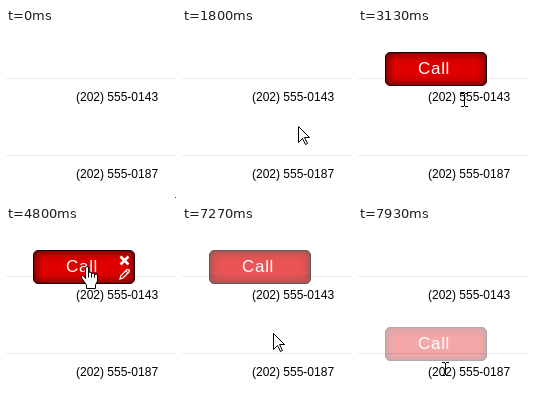
Write an HTML page that moves like this. It is 170 px wide and 170 px high and loops after 8 s.

```html
<!DOCTYPE html>
<html lang="en">
<head>
<meta charset="utf-8">
<title>Click to call</title>
<style>
  html, body { margin: 0; width: 100%; height: 100%; overflow: hidden; background: #fff; }
  body { position: relative; font: 12px/14px Arial, "Liberation Sans", sans-serif; color: #000; }
  .row { position: absolute; left: 0; width: 100%; height: 1px; background: #ebebeb; }
  .row span { position: absolute; left: 70px; top: 12px; white-space: nowrap; }
  #call {
    position: absolute; left: 27px; top: 24px; width: 102px; height: 34px;
    box-sizing: border-box; border: 1px solid #140404; border-radius: 5px;
    background: #e00000; box-shadow: inset 0 0 8px 1px rgba(30, 0, 0, .75);
    opacity: 0;
  }
  #call span {
    position: absolute; left: 32px; top: 6px;
    font-size: 17px; line-height: 20px; letter-spacing: .7px; color: #fff;
  }
  #icons { position: absolute; left: 85px; top: 4px; fill: none; stroke: #fff; }
  #pointer { position: absolute; left: 0; top: 0; }
</style>
</head>
<body>
<div class="row" style="top:50px"><span>(202) 555-0143</span></div>
<div class="row" style="top:127px"><span>(202) 555-0187</span></div>

<div id="call">
  <span>Call</span>
  <svg id="icons" width="11" height="25">
    <path d="M1.5 1.5l8 8M9.5 1.5l-8 8" stroke-width="2.6"/>
    <path d="M1 24l.8-3.2 6-6q1-.8 2 .2t.2 2l-6 6zM6.8 15.8l2.4 2.4" stroke-width="1.2"/>
  </svg>
</div>

<svg id="pointer" width="170" height="170">
  <g id="cursor">
    <path id="arrow" fill="#fff" stroke="#000"
      d="M.5 .5V16.5L4.5 12.5L7.5 18.5L9.5 17.5L6.5 11.5H11.5Z"/>
    <path id="beam" d="M-3-7h3v1h1v-1h3v1h-3v12h3v1h-3v-1h-1v1h-3v-1h3v-12h-3z"/>
    <g id="hand" transform="translate(-7 -1)" stroke="#000" fill="#fff">
      <path d="M5.5 12V2a1.5 1.5 0 0 1 3 0V7.5a1.5 1.5 0 0 1 3 0V8.5a1.5 1.5 0 0 1 3 0V9.5a1.5 1.5 0 0 1 3 0V15l-2 4v3.5h-9V19l-5-7.2q-.8-2 1-2.2 1.6 .4 3 3z"/>
      <path fill="none" d="M8.5 7v4.5M11.5 8v3.5M14.5 9v2.5"/>
    </g>
  </g>
</svg>

<script>
const LOOP = 8000, STEP = 200 / 3, FADE = 450, ROW = 77;
const $ = id => document.getElementById(id);
const call = $('call'), icons = $('icons'), cursor = $('cursor');
const shapes = ['arrow', 'beam', 'hand'].map($);

const settle = u => 1 - (1 - u) ** 1.5;
const smooth = u => u * u * (3 - 2 * u);
const progress = (t, from, to) => Math.min(1, Math.max(0, (t - from) / (to - from)));

// Pointer moves, each starting where the one before ended
const moves = [
  { from: 1000, to: 1933, x: 113, y: 98, ease: settle },
  { from: 2067, to: 3000, x: 106, y: 72, ease: settle },
  { from: 4067, to: 4600, x: 81, y: 41, ease: smooth },
  { from: 6467, to: 7800, x: 87, y: 143, ease: smooth, bow: 6 }
];

function pointerAt(t) {
  if (t < 199) return [169, 169];
  let x = 172, y = 99;
  for (const m of moves) {
    const u = progress(t, m.from, m.to), s = m.ease(u);
    x += (m.x - x) * s + (m.bow || 0) * Math.sin(Math.PI * u);
    y += (m.y - y) * s;
  }
  return [Math.round(x), Math.round(y)];
}

const fade = (t, start) => .5 - Math.cos(progress(t, start, start + FADE) * Math.PI) / 2;

function draw(time) {
  const t = Math.floor((time % LOOP + 4) / STEP) * STEP;
  const [x, y] = pointerAt(t);

  const second = t > 7650;
  const shown = second ? fade(t, 7755) : fade(t, 2635) - fade(t, 7090);
  call.style.opacity = shown;
  call.style.top = 24 + (second ? ROW : 0) + 'px';

  const overText = x > 69 && x < 152 && [62, 62 + ROW].some(top => y >= top && y < top + 15);
  const overCall = !second && shown > 0 && x >= 27 && x < 129 && y >= 24 && y < 58;
  const kind = overCall ? 2 : overText ? 1 : 0;
  shapes.forEach((s, i) => s.style.display = i === kind ? '' : 'none');
  icons.style.display = overCall ? '' : 'none';
  cursor.setAttribute('transform', `translate(${x} ${y})`);
}

const begin = performance.now();
function tick() {
  draw(performance.now() - begin);
  requestAnimationFrame(tick);
}
tick();
</script>
</body>
</html>
```
